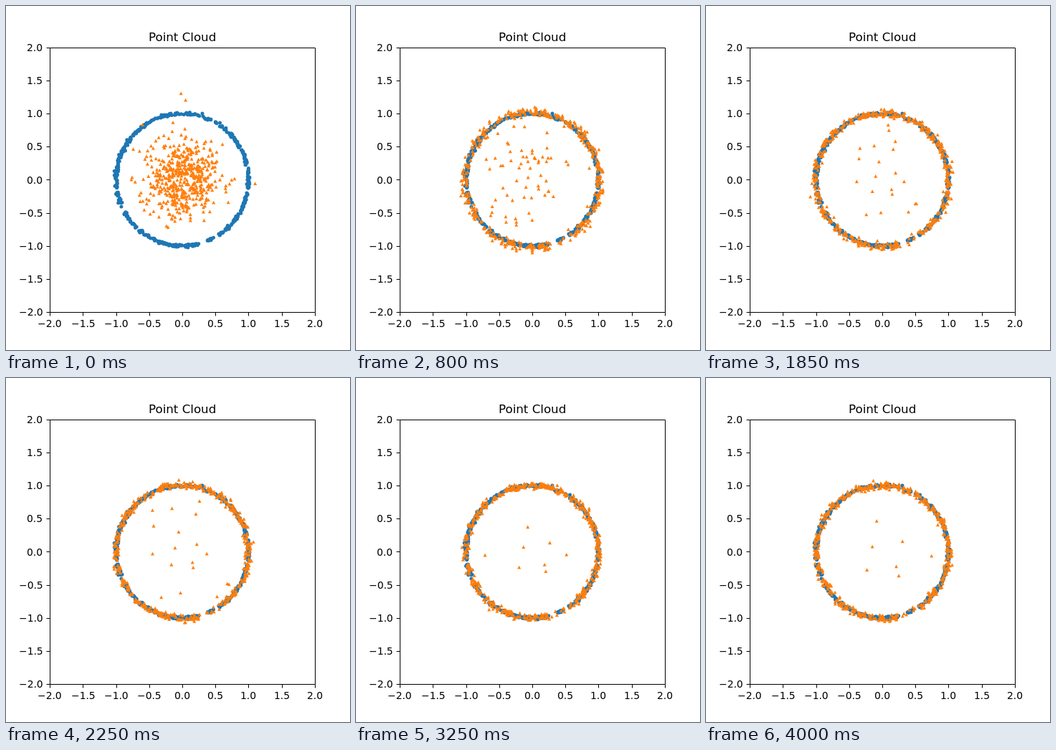
An HTML page with a canvas that plays this animation: 480 px wide and 480 px high, repeating every 4050 ms.

```html
<!DOCTYPE html>
<html lang="en">
<head>
<meta charset="utf-8">
<title>Point Cloud</title>
<style>
html, body { margin: 0; width: 100%; height: 100%; overflow: hidden; background: #fff; }
canvas, svg { position: absolute; left: 0; top: 0; width: 480px; height: 480px; }
text { font: 13.89px "DejaVu Sans", sans-serif; }
.title { font-size: 16.67px; }
path { fill: none; stroke: #000; }
</style>
</head>
<body>
<canvas id="cloud" width="480" height="480"></canvas>
<svg id="axes" viewBox="0 0 480 480"></svg>
<script>
const STEP = 50, FRAMES = 81, COUNT = 500;
const toX = x => 246 + 92.4 * x;
const toY = y => 242.4 - 92.4 * y;

// Axes
const axes = document.getElementById('axes');
const snap = v => Math.floor(v + 0.5) + 0.5;

function add(tag, attrs) {
  const node = document.createElementNS('http://www.w3.org/2000/svg', tag);
  for (const key in attrs) node.setAttribute(key, attrs[key]);
  return axes.appendChild(node);
}
// Text starts on a whole pixel; align is the share of its width left of x.
function label(text, x, y, align, className = '') {
  const node = add('text', { y: Math.round(y), class: className });
  node.textContent = text;
  node.setAttribute('x', Math.round(x - align * node.getComputedTextLength()));
}

const left = snap(toX(-2)), right = snap(toX(2));
const upper = snap(toY(2)), lower = snap(toY(-2));
let lines = `M${left} ${upper}H${right}V${lower}H${left}Z`;
for (let v = -2; v <= 2; v += 0.5) {
  const text = v.toFixed(1).replace('-', '\u2212');
  lines += `M${snap(toX(v))} ${lower}v5M${left} ${snap(toY(v))}h-5`;
  label(text, toX(v), 448, 0.5);
  label(text, 51.5, toY(v) + 5.2, 1);
}
add('path', { d: lines });
label('Point Cloud', 246, 49, 0.5, 'title');

// Seeded random numbers
let seed = 7351;
function rand() {
  seed = (seed + 0x6D2B79F5) | 0;
  let t = Math.imul(seed ^ (seed >>> 15), 1 | seed);
  t = (t + Math.imul(t ^ (t >>> 7), 61 | t)) ^ t;
  return ((t ^ (t >>> 14)) >>> 0) / 4294967296;
}
const gauss = () => Math.sqrt(-2 * Math.log(1 - rand())) * Math.cos(2 * Math.PI * rand());
const place = (r, a) => [toX(r * Math.cos(a)), toY(r * Math.sin(a))];

// Fixed ring, open near the bottom right
const inGap = a => (a > -1.297 && a < -1.192) || (a > -1.052 && a < -0.995);
const ring = [];
while (ring.length < COUNT) {
  const a = (2 * rand() - 1) * Math.PI;
  if (!inGap(a)) ring.push(place(1 + 0.011 * gauss(), a));
}

// Outward flow of the moving points, slowing with time
const rate = (r, n) =>
  (0.0085 + 0.05 * Math.max(0, r - 0.3)) * (1 + 14 * Math.exp(-n / 11));
const rim = n => 1 + 0.05 * Math.exp(-n / 12) * Math.min(1, n / 4);
const spread = n => (0.027 + 0.05 * Math.exp(-n / 9)) * Math.min(1, n / 4);

function advance(r, n) {
  const edge = rim(n);
  return r < edge ? Math.min(edge, r * (1 + rate(r, n))) : r + (edge - r) * 0.12;
}
function rewind(r, n) {
  while (n-- > 0) r /= 1 + rate(r, n);
  return r;
}

// A few outliers at the start, and slow points near the middle at a later step
const outliers = [[-0.02, 1.3], [0.05, 1.2], [-0.6, 0.83], [1.1, -0.06]];
const slow = [[-0.1, 0.05], [-0.05, 0.27], [0.2, 0.1], [0.14, -0.15],
  [0.15, -0.22], [-0.15, -0.18], [0.33, -0.03], [-0.39, -0.03]];
const polar = ([x, y], n) => [rewind(Math.hypot(x, y), n), Math.atan2(y, x)];

const starts = [...outliers.map(p => polar(p, 0)), ...slow.map(p => polar(p, 37))];
while (starts.length < COUNT) {
  const [r, a] = polar([0.29 * gauss(), 0.29 * gauss()], 0);
  if (r > 0.085 && r < 0.9 && !inGap(a)) starts.push([r, a]);
}

const tracks = starts.map(([r, a]) => {
  const track = [];
  let u = gauss(), v = gauss();
  for (let n = 0; n < FRAMES; n++) {
    const jitter = Math.min(1, Math.max(0, (r - 0.7) / 0.25)) * spread(n);
    track.push(place(r + jitter * u, a + 0.6 * jitter * v));
    r = advance(r, n);
    u = 0.6 * u + 0.8 * gauss();
    v = 0.6 * v + 0.8 * gauss();
  }
  return track;
});

// Drawing
const ctx = document.getElementById('cloud').getContext('2d');
function draw(n) {
  ctx.clearRect(0, 0, 480, 480);
  ctx.fillStyle = '#1f77b4';
  for (const [x, y] of ring) {
    ctx.beginPath();
    ctx.arc(x, y, 2.5, 0, 2 * Math.PI);
    ctx.fill();
  }
  ctx.fillStyle = '#ff7f0e';
  for (const track of tracks) {
    const [x, y] = track[n];
    ctx.beginPath();
    ctx.moveTo(x, y - 2.8);
    ctx.lineTo(x + 2.5, y + 2);
    ctx.lineTo(x - 2.5, y + 2);
    ctx.fill();
  }
}

let shown = 0;
draw(0);
const began = performance.now();
function tick() {
  const n = Math.floor(Math.max(0, performance.now() - began) / STEP) % FRAMES;
  if (n !== shown) draw(shown = n);
  requestAnimationFrame(tick);
}
requestAnimationFrame(tick);
</script>
</body>
</html>
```
